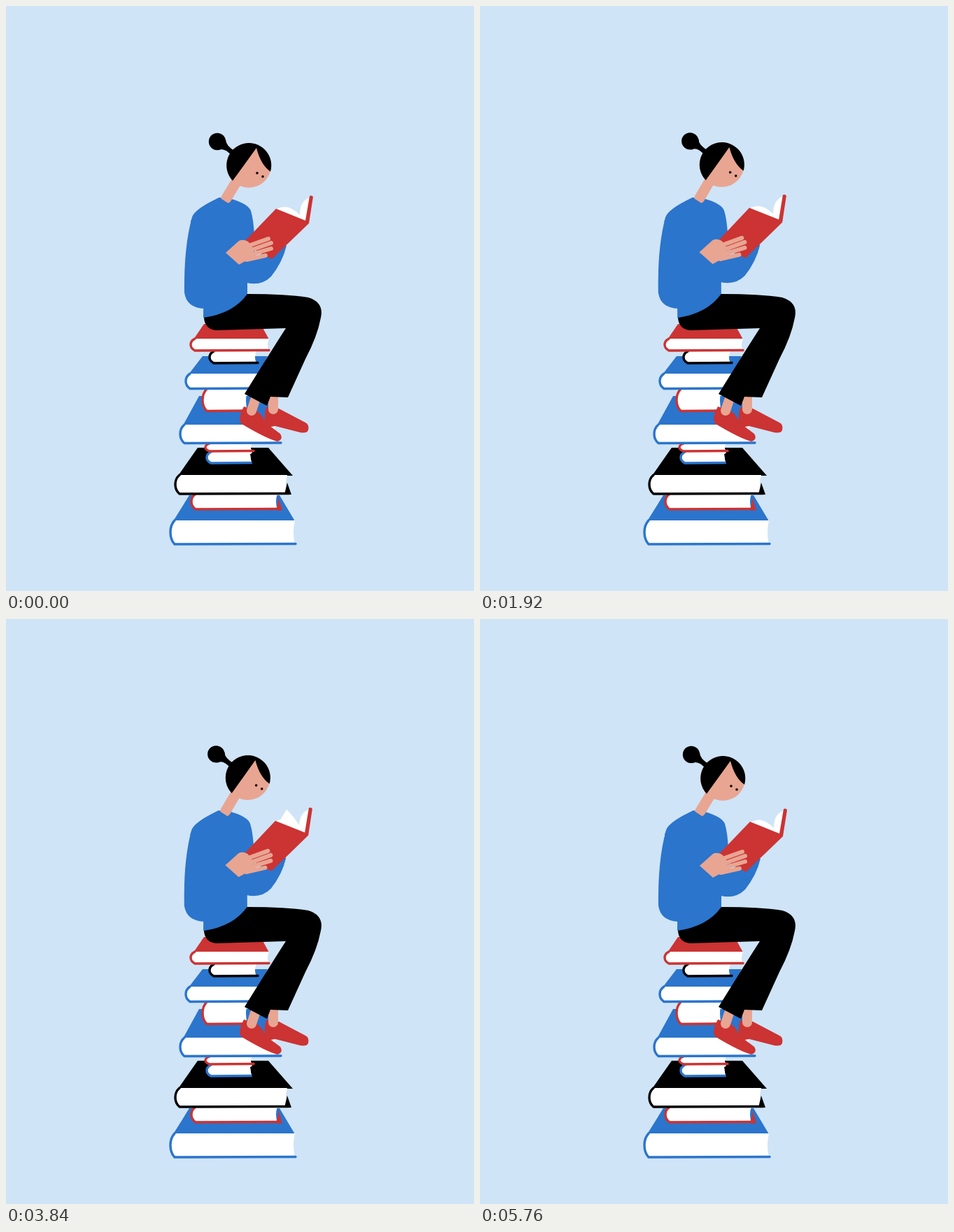
An HTML page for the animation above (5.84 s loop, 669 by 837 pixels).

```html
<!DOCTYPE html>
<html lang="en">
<head>
<meta charset="utf-8">
<title>Reader on a pile of books</title>
<style>
  html, body { margin: 0; width: 100%; height: 100%; overflow: hidden; background: #cfe4f7; }
  svg { display: block; width: 100%; height: 100%; }
  .blue { fill: #2b75cc; } .red { fill: #cc3333; } .skin { fill: #e8a592; } .white { fill: #fff; }
  .line { fill: none; stroke-linecap: round; stroke-linejoin: round; }
  .flesh { stroke: #e8a592; } .paper { stroke: #fff; stroke-width: 4; }
</style>
</head>
<body>
<svg viewBox="0 0 669 837">
  <g id="pile"></g>

  <g id="legs">
    <path class="red" d="M372 574L390 576L428 596Q434 599 432 607Q430 612 420 610L385 601L373 603Q367 590 372 574Z"/>
    <path class="red" d="M340 573L358 579Q366 584 372 597L392 612Q397 620 388 623Q372 619 337 598Q330 592 340 573Z"/>
    <path class="line flesh" stroke-width="14" d="M382 560V577M356 564L351 579"/>
    <path d="M345 412Q400 412 432 417Q455 424 450 446Q445 473 428 505L403 560L378 559L373 572L341 555Q375 500 400 461L300 464Q284 462 283 446L290 438L340 412Z"/>
  </g>

  <g id="upper">
    <path class="blue" id="farRead" d="M344 370L385 340L401 343Q395 367 379 387Q365 401 344 396Z"/>
    <g id="farOpen">
      <path class="skin" d="M413 358L424 347L445 350L448 364L440 371L419 376Z"/>
      <path class="line flesh" stroke-width="6" d="M425 358L428 340M432 356L464 339M436 359L474 348M436 363L473 357M430 369L456 367"/>
      <path class="blue" d="M340 372L358 373Q366 376 413 356L419 377Q385 399 362 403Q350 402 340 390Z"/>
    </g>
    <path class="blue" d="M305 274L322 276Q346 283 350 293Q354 306 355 330L357 374L345 396V412Q325 440 282 446L283 345L264 308Q270 292 305 274Z"/>
    <path class="line flesh" id="neck" stroke-width="15"/>
    <g id="head">
      <circle class="skin" r="32"/>
      <path d="M11 -25Q-4 -4 -23 22A32 32 0 1 1 31 9Q17 -1 11 -25Z"/>
      <circle cx="-45" cy="-34" r="12.2"/>
      <path d="M-41 -23Q-32 -24 -24 -13L-19 -20Q-33 -28 -33 -37Z"/>
      <circle cx="12" cy="11" r="1.8"/>
      <circle cx="20" cy="16" r="1.8"/>
    </g>
    <g id="reading">
      <path class="blue" d="M305 274Q270 290 266 302Q254 345 255 410Q258 432 284 433L344 400L345 300Z"/>
      <g id="held">
        <path class="white" d="M386 291Q403 281 420 299Q420 279 434 274L431 307L420 309Z"/>
        <path class="white" id="page"/>
        <path class="red" d="M434 272Q437 270 439 273L433 311L380 362L338 340L386 290L428 307Z"/>
        <path class="skin" d="M314 353L333 336Q339 333 346 337L352 344L355 358L333 370Z"/>
        <path class="line flesh" stroke-width="6" d="M344 344L375 333M348 350L379 339M349 356L379 347M344 363L371 357"/>
      </g>
    </g>
    <g id="tossing">
      <g id="loose">
        <path class="white" d="M241 568L206 590L208 630Q222 622 224 604L238 578Z"/>
        <path class="line paper" d="M214 600Q230 597 243 587M214 600Q230 598 243 602M214 600Q228 602 232 609M214 604Q220 612 220 626"/>
        <path class="red" d="M180 524L220 498L242 566Q222 578 208 592L209 635Q205 639 200 636L199 592Z"/>
      </g>
      <g id="arm">
        <path class="skin" d="M201 472L224 476Q230 490 225 503L218 506L195 512L190 508Q194 490 201 472Z"/>
        <path class="line flesh" stroke-width="6.5" d="M198 495L192 518M203 500L198 530M209 500L206 532M215 500L213 530"/>
        <path class="blue" d="M305 274Q268 290 250 316Q214 368 208 400L194 469L221 476Q229 425 235 410L272 348Q278 341 283 350L310 340Z"/>
      </g>
    </g>
  </g>
</svg>
<script>
const LOOP = 5840, STEP = 80;
const $ = id => document.getElementById(id);
const BLUE = '#2b75cc', RED = '#cc3333', BLACK = '#000';

// Cover from (topLeft..topRight, top) to (left..right, mid), page block down to bottom.
function book(color, left, right, mid, bottom, edge = right, topLeft, topRight, top, coverRight = right) {
  const cover = top ? `<path fill="${color}" d="M${topLeft} ${top}H${topRight}L${coverRight} ${mid + 1}H${left}Z"/>` : '';
  const bulge = (bottom - mid) / 4, out = left - 6;
  const spine = `M${left + 2} ${mid}C${out} ${mid + bulge} ${out} ${bottom - bulge} ${left + 2} ${bottom}`;
  return cover +
    `<path class="white" d="${spine}H${right}Q${right - 4} ${(mid + bottom) / 2} ${right} ${mid}Z"/>` +
    `<path class="line" stroke="${color}" stroke-width="3.4" d="${spine}L${edge} ${bottom - .5}"/>`;
}
const wedge = (color, d) => `<path fill="${color}" d="${d}Z"/>`;

$('pile').innerHTML =
  book(BLUE, 239, 413, 736, 770, 414, 262, 391, 700) +
  book(RED, 269, 388, 698, 720, 392) + wedge(RED, 'M389 702L395 722L385 721Q390 714 389 702') +
  book(BLACK, 246, 402, 671, 698, 405, 274, 375, 632, 410) + wedge(BLACK, 'M402 682L408 699H398') +
  book(BLUE, 291, 352, 638, 654, 351) + wedge(BLACK, 'M357 638L349 641Q350 648 352 655L362 652') +
  book(RED, 289, 352, 626, 637, 354) +
  book(BLUE, 253, 385, 599, 625.5, 393, 276, 372, 558) +
  book(RED, 285, 345, 548, 579.5, 346) +
  book(BLUE, 261, 362, 526, 547.5, 362, 281, 374, 501) +
  book(BLACK, 295, 358, 494, 511, 360) +
  book(RED, 268, 376, 476, 493, 376, 283, 364, 455);

// Smoothly interpolates between [time, value] keys.
function track(t, ...keys) {
  if (t <= keys[0][0]) return keys[0][1];
  for (let i = 1; i < keys.length; i++) {
    const [t0, a] = keys[i - 1], [t1, b] = keys[i];
    if (t <= t1) {
      const u = (t - t0) / (t1 - t0);
      return a + (b - a) * u * u * (3 - 2 * u);
    }
  }
  return keys[keys.length - 1][1];
}

const show = (id, visible) => $(id).setAttribute('display', visible ? 'inline' : 'none');
const move = (id, transform) => $(id).setAttribute('transform', transform);

const CATCH = 5440, RELEASE = 4960;

function render(t) {
  const sway = track(t, [0, 0], [560, .2], [1200, 1], [1920, -.4], [2480, -.6], [3040, -1], [3200, -1], [3840, -.4], [4480, 0]);
  const turn = track(t, [4480, 0], [4720, 1], [5360, 1], [5680, 0]);
  const reading = t < 4560 || t > CATCH;

  move('upper', `rotate(${sway} 300 430)`);
  const hx = 347 - 14 * turn, hy = 228 - 7 * turn + sway * 1.5;
  move('head', `translate(${hx} ${hy}) rotate(${-24 * turn})`);
  $('neck').setAttribute('d', `M${329 - 3 * turn} ${252 - 3 * turn + sway * 1.5}L315 275`);

  show('reading', reading);
  show('farRead', reading);
  show('farOpen', !reading);
  show('tossing', !reading);

  if (reading) {
    const pull = t > CATCH ? track(t, [CATCH, 45], [5680, 0]) : 0;
    move('held', `translate(${pull} ${sway * 1.5 - pull / 4})`);
    move('farRead', `translate(0 ${sway * 1.5})`);
    const p = track(t, [2960, 0], [3200, .36], [3840, .68], [4160, 1]);
    show('page', p > 0 && p < 1);
    const tipX = 434 - 47 * p, tipY = 276 + 12 * p - 48 * p * (1 - p);
    $('page').setAttribute('d', `M${tipX} ${tipY}Q${tipX + 20 * p} ${tipY + 13} 423 302L${416 - 36 * p} ${301 - 14 * p}Z`);
    return;
  }

  const swing = track(t, [4480, -35], [4720, 0], [RELEASE, 95], [5040, 112], [CATCH, -8]);
  move('arm', `rotate(${swing} 285 310)`);
  if (t <= RELEASE) {
    move('loose', `rotate(${swing} 285 310)`);
  } else {
    const u = (t - RELEASE) / (CATCH - RELEASE);
    const x = 47 + 408 * u, y = 214 + 101 * u - 1200 * u * (1 - u);
    move('loose', `translate(${x} ${y}) rotate(${95 + 130 * u}) translate(-210 -555)`);
  }
}

function frame(now) {
  render(Math.floor(now % LOOP / STEP) * STEP);
  requestAnimationFrame(frame);
}
render(0);
requestAnimationFrame(frame);
</script>
</body>
</html>
```
